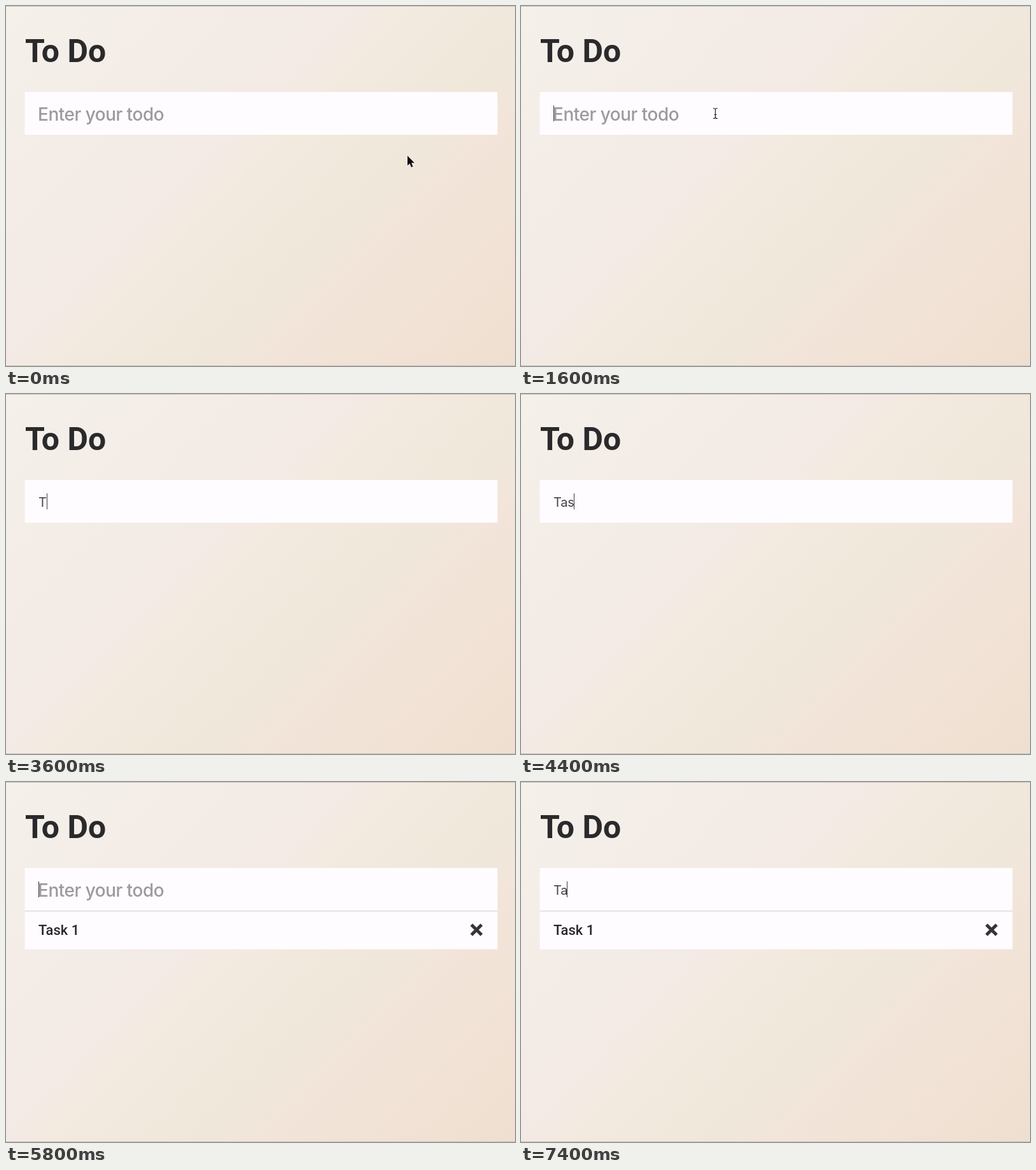
An HTML page that plays this animation: 800x565 px, repeating every 8000 ms.

```html
<!DOCTYPE html>
<html lang="en">
<head>
<meta charset="utf-8">
<title>To Do</title>
<style>
  html, body { margin: 0; width: 100%; height: 100%; overflow: hidden; }
  body {
    background: linear-gradient(135deg, #f5f0ea 0%, #f3eae5 41%, #f3eadf 47%, #f0e7db 65%, #f3e4d9 72%, #eedfd0 100%);
  }
  svg { display: block; width: 100vw; height: 100vh; }
  text { white-space: pre; }
  .title { font: 700 50px Roboto, sans-serif; fill: #2a2a2c; }
  .hint { font: 500 28px Inter, sans-serif; letter-spacing: -.5px; fill: #9c9a9c; }
  .typed { font: 400 20px Inter, sans-serif; letter-spacing: -.2px; fill: #444346; }
  .task { font: 500 22px Roboto, sans-serif; fill: #29282b; }
</style>
</head>
<body>
<svg viewBox="0 0 800 565">
  <path d="M0 .5H800M0 564.5H800" stroke="#c9c1bb"/>
  <text class="title" x="30" y="88">To Do</text>
  <rect x="29.5" y="135" width="743" height="67" fill="#fefcff"/>
  <text class="hint" id="hint" x="50" y="180">Enter your todo</text>
  <text class="typed" id="typed" x="51" y="176.5"></text>
  <path id="caret" d="M.5 156V181" stroke="#3c3b3e"/>
  <g id="item">
    <rect x="29.5" y="202" width="743" height="60.5" fill="#fefcff"/>
    <path d="M29.5 202.5H772.5" stroke="#cfcdd0"/>
    <text class="task" x="51" y="240">Task 1</text>
    <path d="M731.5 224L747.5 240M747.5 224L731.5 240" stroke="#343336" stroke-width="5"/>
  </g>
  <path id="arrow" d="M0 0V15.5L3.5 12.2L6 18L8.6 16.9L6.2 11.2H11Z" fill="#0c0c0e" stroke="#fff" stroke-width="1" paint-order="stroke"/>
  <path id="beam" d="M-3.5 -8Q0 -8 0 -6Q0 -8 3.5 -8M0 -6V6M-3.5 8Q0 8 0 6Q0 8 3.5 8M-2 2H2" fill="none" stroke="#222124" stroke-width="1.2"/>
</svg>
<script>
  const LOOP = 8000;
  const $ = id => document.getElementById(id);

  // time, pointer shape, x, y
  const pointer = [
    [0, "arrow", 631, 235], [200, "arrow", 522, 186], [400, "arrow", 506, 185],
    [600, "arrow", 370, 163], [800, "arrow", 339, 163],
    [1200, "beam", 330.5, 163], [1400, "beam", 310.5, 167.5], [1600, "beam", 305.5, 168.5],
    [3600, "none", 0, 0]
  ];

  // time, typed text, caret x (0 = hidden)
  const input = [
    [0, "", 0], [1600, "", 51], [2200, "", 0], [2600, "", 51], [3200, "", 0],
    [3600, "T", 64], [4200, "Ta", 72], [4400, "Tas", 83], [4600, "Task", 94],
    [5200, "Task ", 99], [5400, "Task 1", 108],
    [5800, "", 51], [6400, "", 0], [6800, "", 51], [7200, "T", 64], [7400, "Ta", 72]
  ];

  const at = (steps, t) => steps.findLast(s => s[0] <= t);
  const show = (id, on) => $(id).style.display = on ? "" : "none";
  const move = (id, x, y) => $(id).setAttribute("transform", `translate(${x} ${y})`);

  function draw(now) {
    const t = now % LOOP;
    const [, shape, x, y] = at(pointer, t);
    for (const id of ["arrow", "beam"]) {
      show(id, id === shape);
      move(id, x, y);
    }
    const [, text, caretX] = at(input, t);
    $("typed").textContent = text;
    show("hint", !text);
    show("caret", caretX);
    move("caret", caretX, 0);
    show("item", t >= 5800);
  }

  const start = performance.now();
  function tick() {
    draw(performance.now() - start);
    requestAnimationFrame(tick);
  }
  tick();
</script>
</body>
</html>
```
